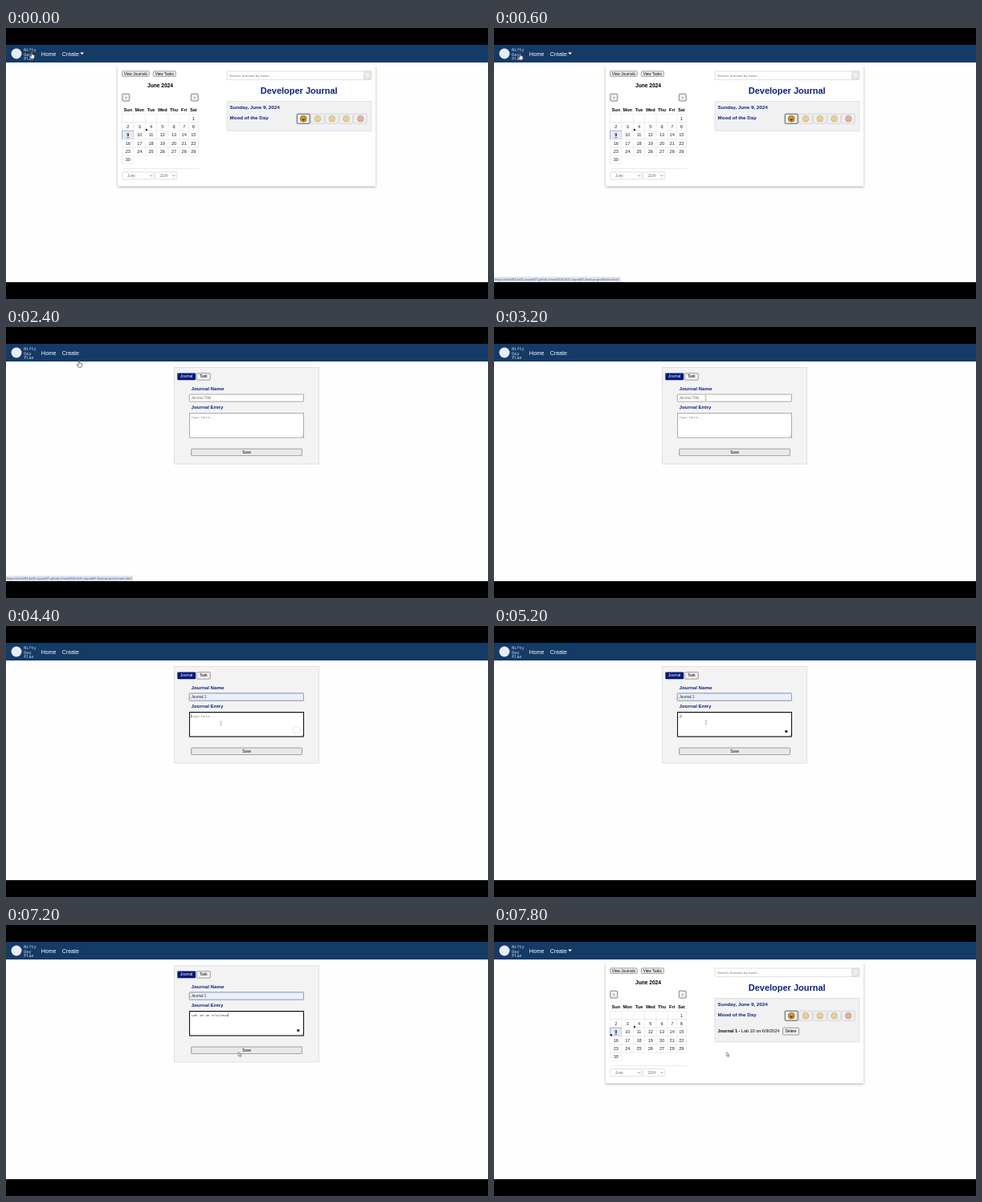
An HTML page for the animation above (8 s loop, 600x338 px).

```html
<!DOCTYPE html>
<html lang="en">
<head>
<meta charset="utf-8">
<title>Developer Journal</title>
<style>
html, body { margin: 0; width: 100%; height: 100%; overflow: hidden; background: #000; }
svg { display: block; width: 100vw; height: 100vh; font: 4.7px "Liberation Sans", Arial, sans-serif; }
text { white-space: pre; }
.mid { text-anchor: middle; }
.bold { font-weight: bold; }
.navy { fill: #0b2080; }
.label { font-size: 6.2px; font-weight: bold; fill: #0b2080; }
.nav { font-size: 7px; fill: #fff; }
.item { font-size: 6.9px; fill: #222; }
.mono { font: 4.27px "Liberation Mono", monospace; }
.brand { font: 5.1px "DejaVu Sans Mono", monospace; fill: #cfdaea; }
.hint { fill: #777; }
.btn { fill: #efefef; stroke: #666; stroke-width: .6; }
.field { fill: #fff; stroke: #ccc; stroke-width: .6; }
.input { fill: #fff; stroke: #888; stroke-width: .7; }
.focus { fill: none; stroke: #151515; stroke-width: 1.1; }
.panel { fill: #f1f1f2; stroke: #d8d8d8; stroke-width: .7; }
.cell { fill: #fff; stroke: #e2e2e4; stroke-width: .5; }
.rule { fill: none; stroke: #ddd; stroke-width: .6; }
.chevron { fill: none; stroke: #555; stroke-width: .7; }
.raised { fill: #fff; filter: drop-shadow(0 1px 1.5px #0005); }
.status { font-size: 4.1px; fill: #4d57a8; }

.show { animation: 8s step-end infinite; }
.home { animation-name: home; }
.form { animation-name: form; }
.logo-link { animation-name: logo-link; }
.menu { animation-name: menu; }
.menu-link { animation-name: menu-link; }
.title-empty { animation-name: title-empty; }
.title-focus { animation-name: title-focus; }
.title-filled { animation-name: title-filled; }
.entry-empty { animation-name: entry-empty; }
.entry-focus { animation-name: entry-focus; }
.helper-idle { animation-name: helper-idle; }
.helper-busy { animation-name: helper-busy; }
.saved { animation-name: saved; }
.hand { animation-name: hand; }
.arrow { animation-name: arrow; }
.beam { animation-name: beam; }
.typing { animation: typing 8s infinite; }
.pointer { animation: pointer 8s infinite; }

@keyframes home { 0%, 92.5% { opacity: 1 } 30%, 100% { opacity: 0 } }
@keyframes form { 0%, 92.5% { opacity: 0 } 30% { opacity: 1 } 100% { opacity: 0 } }
@keyframes logo-link { 0%, 17.5%, 100% { opacity: 0 } 5% { opacity: 1 } }
@keyframes menu { 0%, 30%, 100% { opacity: 0 } 20% { opacity: 1 } }
@keyframes menu-link { 0%, 35%, 100% { opacity: 0 } 25% { opacity: 1 } }
@keyframes title-empty { 0% { opacity: 1 } 47.5%, 100% { opacity: 0 } }
@keyframes title-focus { 0%, 52.5%, 100% { opacity: 0 } 42.5% { opacity: 1 } }
@keyframes title-filled { 0% { opacity: 0 } 47.5%, 100% { opacity: 1 } }
@keyframes entry-empty { 0% { opacity: 1 } 65%, 100% { opacity: 0 } }
@keyframes entry-focus { 0% { opacity: 0 } 52.5%, 100% { opacity: 1 } }
@keyframes helper-idle { 0%, 65%, 100% { opacity: 0 } 52.5% { opacity: 1 } }
@keyframes helper-busy { 0% { opacity: 0 } 65%, 100% { opacity: 1 } }
@keyframes saved { 0% { opacity: 0 } 92.5%, 100% { opacity: 1 } }
@keyframes hand { 0% { opacity: 1 } 32.5%, 100% { opacity: 0 } }
@keyframes arrow { 0%, 40% { opacity: 0 } 32.5%, 87.5%, 100% { opacity: 1 } }
@keyframes beam { 0%, 87.5%, 100% { opacity: 0 } 40% { opacity: 1 } }
@keyframes typing {
  0% { transform: none; animation-timing-function: step-end }
  62.5% { transform: translateX(0); animation-timing-function: steps(6) }
  77.5% { transform: translateX(15.4px); animation-timing-function: steps(4) }
  87.5%, 100% { transform: translateX(46.2px) }
}
@keyframes pointer {
  0% { transform: translate(32px, 30px); animation-timing-function: step-end }
  5%, 15% { transform: translate(32.5px, 31.5px); animation-timing-function: steps(2) }
  20% { transform: translate(82px, 34px); animation-timing-function: steps(1) }
  22.5%, 32.5% { transform: translate(91px, 42px); animation-timing-function: steps(3) }
  40%, 45% { transform: translate(263.5px, 88.5px); animation-timing-function: steps(3) }
  52.5%, 60% { transform: translate(267.5px, 121.5px); animation-timing-function: steps(2) }
  65%, 85% { transform: translate(263.7px, 120px); animation-timing-function: steps(2) }
  90%, 100% { transform: translate(289.5px, 158.5px) }
}
</style>
</head>
<body>
<svg viewBox="0 0 600 338">
  <defs>
    <clipPath id="typed"><rect class="typing" x="170.5" y="108" width="60" height="10"/></clipPath>
  </defs>
  <rect width="600" height="338"/>
  <rect y="21" width="600" height="296" fill="#fefefe"/>
  <rect y="21" width="600" height="22" fill="#143a66"/>
  <circle cx="13" cy="32" r="6.5" fill="#e6edf5"/>
  <g class="brand">
    <text x="22.3" y="29.4">Nifty</text>
    <text x="22.3" y="34.8">Day</text>
    <text x="22.3" y="40">Plan</text>
  </g>

  <g class="show home">
    <rect class="raised" x="139" y="47" width="321" height="150.5"/>
    <rect x="138" y="43" width="323" height="5" fill="#fefefe"/>
    <rect class="btn" x="144.7" y="53.8" width="33.4" height="6.6" rx="1"/>
    <text class="mid" x="161.4" y="58.8">View Journals</text>
    <rect class="btn" x="183.3" y="53.8" width="28" height="6.6" rx="1"/>
    <text class="mid" x="197.3" y="58.8">View Tasks</text>
    <text class="mid bold" x="192" y="74" font-size="6.6">June 2024</text>
    <rect class="btn" x="144.8" y="82.2" width="9" height="8.8" rx="1.2" style="stroke:#333"/>
    <rect class="btn" x="230.2" y="82.2" width="9" height="8.8" rx="1.2" style="stroke:#333"/>
    <text class="mid" x="149.3" y="88">‹</text>
    <text class="mid" x="234.7" y="88">›</text>
    <g id="calendar" class="mid" font-size="5.6"></g>
    <circle cx="175" cy="127" r="1.2" class="navy"/>
    <path class="rule" d="M144.5 175.5H240"/>
    <rect class="field" x="144.7" y="179.6" width="39.3" height="9" rx="1"/>
    <text class="hint" x="151" y="185.7" font-size="4.5">June</text>
    <rect class="field" x="185.7" y="179.6" width="27" height="9" rx="1"/>
    <text class="hint" x="191.5" y="185.7" font-size="4.5">2024</text>
    <path class="chevron" d="M179 183.4l1.4 1.4 1.4-1.4M207.5 183.4l1.4 1.4 1.4-1.4"/>

    <rect class="field" x="275" y="54" width="179.7" height="10.4" rx="1"/>
    <text class="hint" x="278" y="60.8" font-size="4.4">Search Journals by name ...</text>
    <rect x="445.5" y="54" width="9.2" height="10.4" fill="#e6e6e8" stroke="#ccc" stroke-width=".5"/>
    <circle cx="450" cy="59" r="1.6" fill="none" stroke="#fff" stroke-width=".7"/>
    <text class="mid bold navy" x="364.7" y="81.6" font-size="11">Developer Journal</text>
    <rect class="panel" x="275" y="91.5" width="179.7" height="36.7"/>
    <rect class="panel show saved" x="275" y="91.5" width="179.7" height="54.5"/>
    <text class="label" x="278.5" y="100.6">Sunday, June 9, 2024</text>
    <text class="label" x="278.5" y="114.4">Mood of the Day</text>
    <g id="moods"></g>
    <g class="show saved">
      <circle cx="145.9" cy="137.2" r="1.2" class="navy"/>
      <text x="278.5" y="134.4" font-size="5.5"><tspan class="bold">Journal 1 - </tspan>Lab 10 on 6/9/2024</text>
      <rect class="btn" x="359.5" y="128.2" width="20" height="8.8" rx="1"/>
      <text class="mid" x="369.5" y="134.3">Delete</text>
    </g>
    <g class="show menu">
      <rect x="67.7" y="23.5" width="31" height="17.5" fill="#b06cf0"/>
      <rect class="raised" x="68" y="40.5" width="55" height="35.3" style="fill:#f9f9f9"/>
      <rect x="68" y="40.5" width="55" height="17.5" fill="#dcdcdc"/>
      <text class="item" x="73.5" y="51.3">Journal</text>
      <text class="item" x="73.5" y="69.2">Task</text>
    </g>
    <path d="M92.3 30.6h4.6l-2.3 2.6z" fill="#fff"/>
  </g>

  <text class="nav" x="43.8" y="34.5">Home</text>
  <text class="nav" x="69.8" y="34.5">Create</text>

  <g class="show form">
    <rect class="panel" x="209.7" y="50.5" width="179.8" height="120.5" style="fill:#f3f3f4"/>
    <rect x="213.3" y="57.4" width="22.8" height="8.8" rx="1.2" fill="#041a78"/>
    <text class="mid" x="224.7" y="63.4" fill="#fff">Journal</text>
    <rect class="btn" x="237.3" y="57.6" width="17" height="8.5" rx="1.2"/>
    <text class="mid" x="245.8" y="63.4">Task</text>
    <text class="label" x="230.5" y="78.5">Journal Name</text>
    <rect class="input" x="228.3" y="84" width="142.2" height="9" rx=".8"/>
    <text class="hint show title-empty" x="230.5" y="90.2" font-size="4.6">Journal Title</text>
    <g class="show title-filled">
      <rect class="input" x="228.3" y="84" width="142.2" height="9" rx=".8" style="fill:#e8f0fe"/>
      <text x="230.5" y="90.2" font-size="4.6" fill="#222">Journal 1</text>
    </g>
    <rect class="focus show title-focus" x="228.3" y="84" width="142.2" height="9" rx=".8"/>
    <text class="label" x="230.5" y="102.3">Journal Entry</text>
    <rect class="input" x="228.5" y="107.6" width="142" height="30.4"/>
    <text class="mono hint show entry-empty" x="230.5" y="113.6">Type here...</text>
    <g clip-path="url(#typed)"><text class="mono" x="230.5" y="113.6" fill="#333">Lab 10 on 6/9/2024</text></g>
    <path d="M367.5 137.2l2.4-2.4M369 137.2l.9-.9" stroke="#777" stroke-width=".5"/>
    <g class="show entry-focus">
      <rect class="focus" x="228.5" y="107.6" width="142" height="30.4" rx=".6"/>
      <path class="typing" d="M230.6 109.8v4.6" stroke="#222" stroke-width=".5"/>
    </g>
    <circle class="show helper-idle" cx="362" cy="130" r="4.4" fill="#fff" stroke="#ddd" stroke-width=".7"/>
    <circle class="show helper-busy" cx="363.8" cy="131.5" r="1.8" fill="#3a3a3a"/>
    <rect class="btn" x="230.6" y="152" width="138" height="8.6" rx="1" style="fill:#e9e9ea"/>
    <text class="mid" x="299.5" y="158">Save</text>
  </g>

  <g class="show logo-link">
    <rect y="310.3" width="158" height="6.7" fill="#dfe2e8"/>
    <text class="status" x="1" y="315.3">https://web204-fa31-squad07.github.io/web204-fa31-squad07-final-project/index.html</text>
  </g>
  <g class="show menu-link">
    <rect y="310.3" width="158" height="6.7" fill="#dfe2e8"/>
    <text class="status" x="1" y="315.3">https://web204-fa31-squad07.github.io/web204-fa31-squad07-final-project/create.html</text>
  </g>

  <g class="pointer" stroke-linejoin="round">
    <path class="show hand" d="M-.6 0Q0-.9.7 0V3L3.6 3.7V6.2L2.8 8.2H-.9L-2.8 5.2-2.2 4.4-.6 5.4Z" fill="#fff" stroke="#222" stroke-width=".6"/>
    <path class="show arrow" d="M0 0V5.1L1.2 4.1 2 6 2.9 5.6 2.1 3.8H3.7Z" fill="#fff" stroke="#222" stroke-width=".5"/>
    <path class="show beam" d="M-1-2.7H1M0-2.7V2.7M-1 2.7H1" fill="none" stroke="#666" stroke-width=".5"/>
  </g>
</svg>
<script>
const add = (parent, tag, attrs, text = "") => {
  const node = document.createElementNS("http://www.w3.org/2000/svg", tag);
  for (const key in attrs) node.setAttribute(key, attrs[key]);
  node.textContent = text;
  return parent.appendChild(node);
};

const calendar = document.getElementById("calendar");
const edges = [144.7, 159, 173.5, 187.6, 202, 216.2, 227.2, 239.3];
const rowHeight = 10.35;
["Sun", "Mon", "Tue", "Wed", "Thu", "Fri", "Sat"].forEach((name, col) => {
  const x = (edges[col] + edges[col + 1]) / 2;
  add(calendar, "text", { x, y: 104, class: "bold" }, name);
  for (let row = 0; row < 6; row++) {
    const day = row * 7 + col - 5;
    if (day > 30) continue;
    const y = 107.5 + row * rowHeight;
    const today = day === 9;
    const cell = add(calendar, "rect", { x: edges[col], y, width: edges[col + 1] - edges[col], height: rowHeight, class: "cell" });
    if (today) cell.style.cssText = "fill:#e6ecf7;stroke:#8b9ac4;stroke-width:.8";
    if (day > 0) add(calendar, "text", { x, y: y + 7, class: today ? "bold" : "", fill: "#222" }, day);
    if (today) add(calendar, "path", { d: `M${x - 1.6} ${y + 8.4}h3.2`, stroke: "#333", "stroke-width": .7 });
  }
});

const moods = document.getElementById("moods");
const mouths = ["M-2 .6H2Q0 4-2 .6Z", "M-1.8 1Q0 2.8 1.8 1", "M-1.6 1.6H1.6", "M-1.6 2Q0 .6 1.6 2", "M-1.8 2.3Q0 .3 1.8 2.3"];
mouths.forEach((d, i) => {
  const face = add(moods, "g", { transform: `translate(${370.2 + i * 17.75} 113.2)` });
  add(face, "rect", { x: -8, y: -6, width: 16, height: 12, rx: 1, fill: "#f0f0f0", stroke: i ? "#c4c4c8" : "#444", "stroke-width": i ? .6 : .9 });
  const head = add(face, "g", { opacity: i ? .5 : 1, stroke: "#6b4514", "stroke-width": .6 });
  add(head, "circle", { r: 3.9, fill: i === 4 ? "#e8705c" : i ? "#f3c24c" : "#dca52e" });
  add(head, "path", { d: "M-1.4-1.5v1M1.4-1.5v1", "stroke-width": .8 });
  add(head, "path", { d, fill: i ? "none" : "#5a3410" });
});
</script>
</body>
</html>
```
